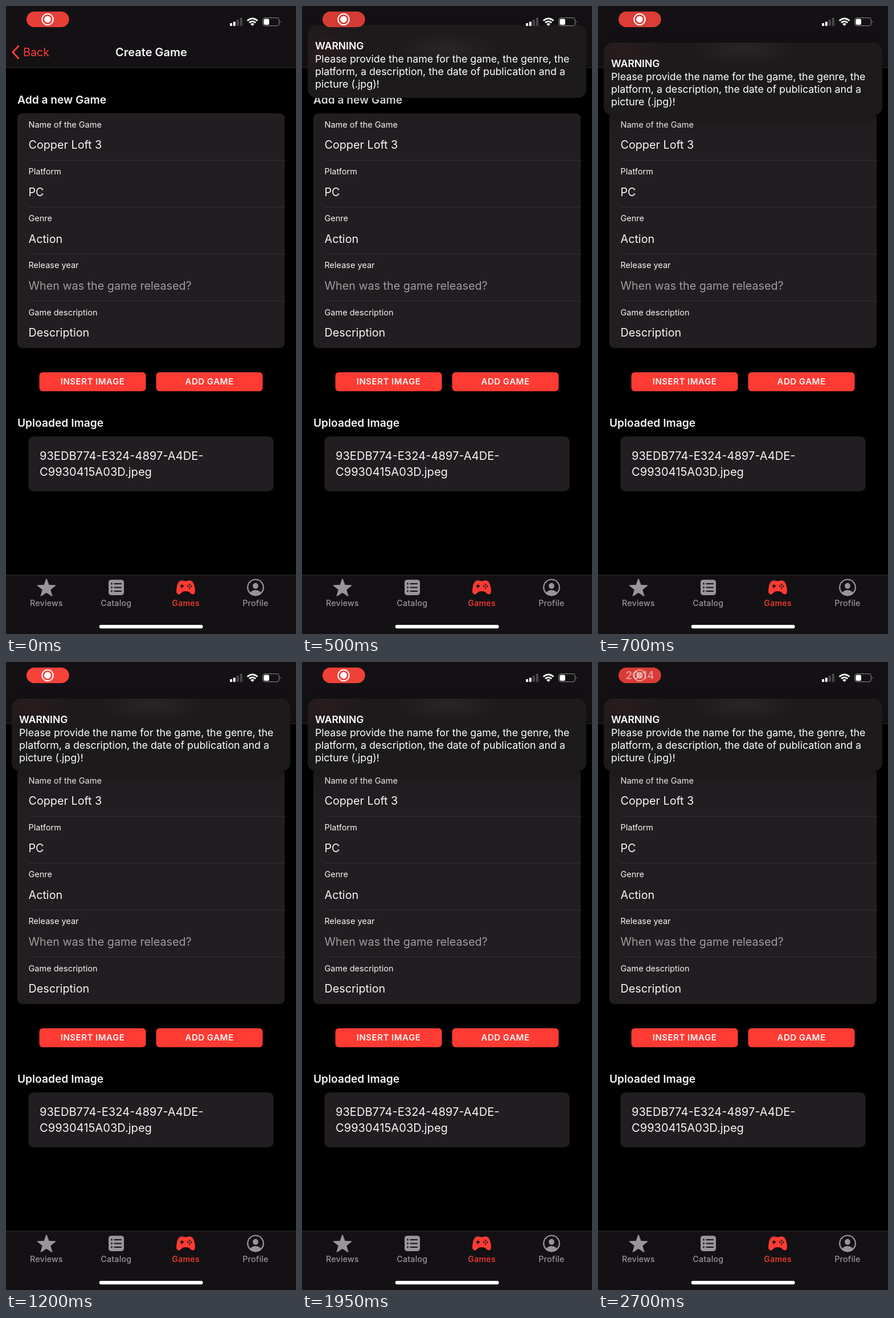
An HTML page for the animation above (2.75 s loop, 509 px wide and 1100 px high).

```html
<!DOCTYPE html>
<html lang="en">
<head>
<meta charset="utf-8">
<title>Create Game</title>
<style>
html, body { margin: 0; width: 100%; height: 100%; overflow: hidden; background: #000; }
body { position: relative; font-family: Inter, Roboto, sans-serif; font-optical-sizing: none; }
svg { position: absolute; left: 0; top: 0; width: 509px; height: 1100px; }
text { fill: #f6f4f6; }
.label { font-size: 14.5px; }
.value { font-size: 19.75px; }
.hint { fill: #9f9c9f; }
.head { font-size: 19.2px; font-weight: 600; }
.button { font-size: 15px; font-weight: 600; letter-spacing: .5px; text-anchor: middle; }
.tab { font-size: 14.2px; font-weight: 500; letter-spacing: .25px; text-anchor: middle; fill: #98959a; }
.red { fill: #ff3b33; }
.grey { fill: #98959a; }
.bar { fill: #141114; }
.card { fill: #211d20; }
.line { stroke: #322f32; }
#banner {
  position: absolute; left: 10px; top: 64px; width: 476px; height: 103px;
  padding: 25px 0 0 13px; border-radius: 16px; color: #fff;
  background:
    radial-gradient(90px 30px at 245px var(--title), rgba(255, 255, 255, .05), transparent),
    radial-gradient(70px 40px at 30px var(--title), rgba(255, 60, 50, .06), transparent),
    #1d1a1c;
  box-shadow: 0 5px 24px rgba(0, 0, 0, .28);
  font-size: 17.8px; line-height: 22px; white-space: nowrap;
}
#banner b { display: block; height: 24px; line-height: 23px; font-size: 17.5px; font-weight: 600; }
</style>
</head>
<body>
<svg viewBox="0 0 509 1100">
  <rect class="bar" width="509" height="108"/>
  <path class="line" d="M0 108H509"/>
  <path d="M22.5 69.5L12 81L22.5 92.5" fill="none" stroke="#ff3b33" stroke-width="3"/>
  <text class="red" x="30" y="88" font-size="19.7">Back</text>
  <text x="255" y="88" font-size="20" font-weight="600" text-anchor="middle">Create Game</text>

  <text class="head" x="20" y="171">Add a new Game</text>
  <rect class="card" x="19.7" y="188" width="469.6" height="411" rx="9"/>
  <g id="form"></g>

  <rect class="red" x="58.500" y="641.400" width="187" height="33.300" rx="6"/>
  <rect class="red" x="263.500" y="641.400" width="187" height="33.300" rx="6"/>
  <text class="button" x="152" y="663">INSERT IMAGE</text>
  <text class="button" x="357" y="663">ADD GAME</text>

  <text class="head" x="20" y="737">Uploaded Image</text>
  <rect class="card" x="39.3" y="754" width="430.4" height="96" rx="9"/>
  <text x="59" y="794.5" font-size="20.1">93EDB774-E324-4897-A4DE-</text>
  <text x="59" y="823" font-size="20.1">C9930415A03D.jpeg</text>

  <rect class="bar" y="996.7" width="509" height="104"/>
  <path class="line" d="M0 997H509"/>
  <path id="star" class="grey" stroke="#98959a" stroke-width="1.5" stroke-linejoin="round"/>
  <rect class="grey" x="180" y="1005" width="27" height="27" rx="4.5"/>
  <g stroke="#141114" stroke-width="2.2" stroke-linecap="round">
    <path d="M190.5 1012H202M190.5 1018.5H202M190.5 1025H202"/>
    <path d="M185.5 1012h.01M185.5 1018.5h.01M185.5 1025h.01" stroke-width="2.8"/>
  </g>
  <g transform="translate(315.5 1018.5) scale(.069) translate(-256 -256)" stroke-linecap="round">
    <path class="red" d="M160 80C198 80 205 96 256 96S314 80 352 80C430 80 462 150 483 245C505 345 497 432 433 432C372 432 380 352 256 352S140 432 79 432C15 432 5 345 28 245C50 150 82 80 160 80Z"/>
    <path d="M124 224h72M160 188v72" stroke="#141114" stroke-width="28"/>
    <path d="M308 224h.1M396 224h.1M352 180h.1M352 268h.1" stroke="#141114" stroke-width="40"/>
  </g>
  <g transform="translate(438 1018.5) scale(.072) translate(-256 -256)">
    <circle class="grey" cx="256" cy="256" r="208"/>
    <path fill="#141114" d="M382 375C350 335 305 320 256 320S162 335 130 375A176 176 0 1 1 382 375Z"/>
    <ellipse class="grey" cx="256" cy="216" rx="68" ry="72"/>
  </g>
  <g id="tabs"></g>
  <rect x="163.600" y="1084" width="182" height="6.200" rx="3.100" fill="#fff"/>
</svg>

<div id="banner"><b>WARNING</b>Please provide the name for the game, the genre, the<br>platform, a description, the date of publication and a<br>picture (.jpg)!</div>

<svg viewBox="0 0 509 1100">
  <rect id="pill" x="36" y="9.800" width="74.700" height="27.300" rx="13.600"/>
  <g id="record">
    <circle cx="73" cy="23.400" r="9.700" fill="none" stroke="#fff" stroke-width="2"/>
    <circle cx="73" cy="23.400" r="5.800" fill="#fff"/>
  </g>
  <text id="clock" x="73.5" y="30.3" font-size="18.6" font-weight="600" text-anchor="middle">20:14</text>
  <g fill="#fff">
    <rect x="393" y="30" width="4" height="5" rx="1"/>
    <rect x="398.8" y="27.5" width="4" height="7.5" rx="1"/>
    <rect x="404.8" y="24" width="4" height="11" rx="1" fill="#4b484b"/>
    <rect x="410.8" y="20.5" width="4" height="14.5" rx="1" fill="#4b484b"/>
    <path d="M432.5 35L429 31.5Q432.5 28.5 436 31.5Z"/>
    <g fill="none" stroke="#fff" stroke-width="2.7">
      <path d="M426.8 29.3Q432.5 24.3 438.2 29.3"/>
      <path d="M423.5 25.8Q432.5 18 441.5 25.8"/>
    </g>
    <rect x="450.7" y="20.7" width="28.6" height="14" rx="4.3" fill="none" stroke="#787578" stroke-width="1.3"/>
    <path d="M481 25.5q2 2.2 0 4.5z" fill="#787578"/>
    <rect x="452.5" y="22.5" width="9.5" height="10.4" rx="2.5"/>
  </g>
</svg>

<script>
const LOOP = 2750;
const $ = id => document.getElementById(id);
const clamp = x => Math.min(1, Math.max(0, x));

const fields = [
  ["Name of the Game", "Copper Loft 3"],
  ["Platform", "PC"],
  ["Genre", "Action"],
  ["Release year", "When was the game released?", "hint"],
  ["Game description", "Description"]
];
$("form").innerHTML = fields.map(([label, value, style = ""], i) => {
  const y = 188 + i * 82.2;
  const line = i ? `<path class="line" d="M40 ${Math.floor(y) + .5}H489"/>` : "";
  return `${line}<text class="label" x="39.5" y="${y + 24.7}">${label}</text>
    <text class="value ${style}" x="39.5" y="${y + 62.3}">${value}</text>`;
}).join("");

$("tabs").innerHTML = ["Reviews", "Catalog", "Games", "Profile"].map((name, i) =>
  `<text class="tab" ${name === "Games" ? 'style="fill:#ff3b33"' : ""} x="${71 + i * 122.3}" y="1051">${name}</text>`
).join("");

$("star").setAttribute("d", "M" + Array.from({ length: 10 }, (_, i) => {
  const r = i % 2 ? 6.8 : 16.3, a = i * Math.PI / 5;
  return `${71 + r * Math.sin(a)} ${1020 - r * Math.cos(a)}`;
}).join("L") + "Z");

function draw() {
  const t = performance.now() % LOOP;

  // The notification eases in; its soft glows stay over the header title.
  const slide = (1 - Math.cos(Math.PI * clamp((t - 218) / 382))) / 2;
  const top = 64 - 200 * (1 - slide);
  const banner = $("banner").style;
  banner.top = top + "px";
  banner.setProperty("--title", 75 - top + "px");
  banner.visibility = slide ? "visible" : "hidden";

  // The pill pulses, then its icon fades into the clock.
  const glow = (1 - Math.cos(2 * Math.PI * (t - 450) / 2100)) / 2;
  const mix = (a, b) => a + (b - a) * glow;
  $("pill").style.fill = `rgb(${mix(214, 255)}, ${mix(60, 69)}, ${mix(53, 58)})`;
  const fade = clamp((t - 2600) / 200);
  $("record").style.opacity = 1 - fade;
  $("clock").style.opacity = fade;

  requestAnimationFrame(draw);
}
draw();
</script>
</body>
</html>
```
